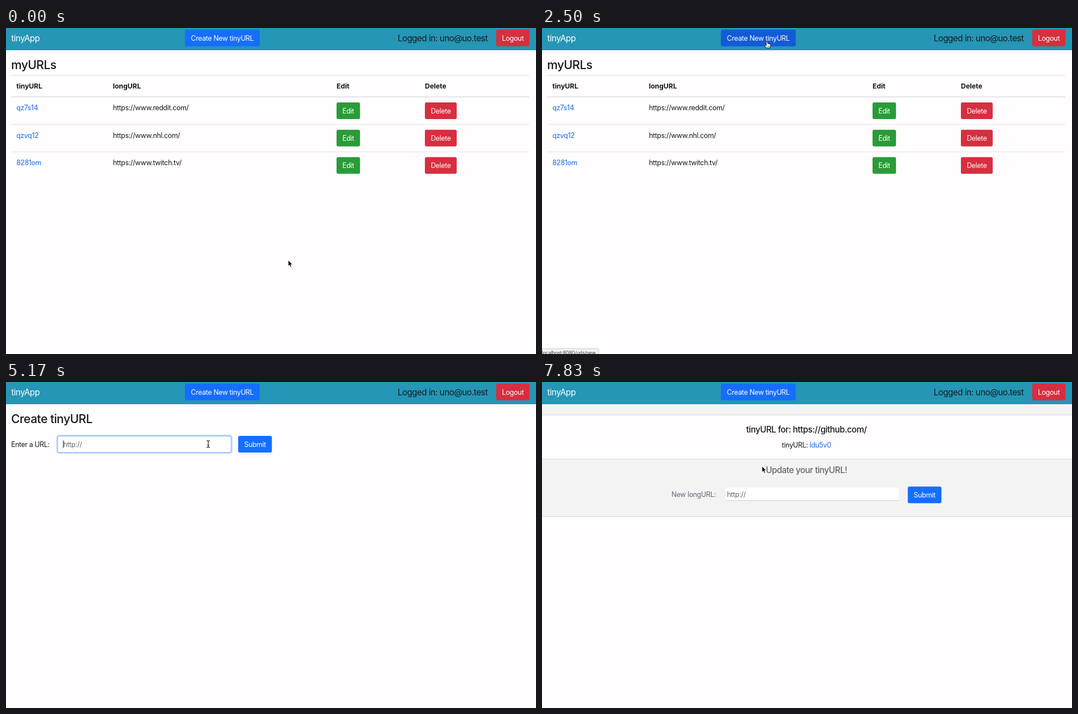
Animation, 954 px wide and 587 px high, one loop 8000 ms. Source, as an HTML page:

```html
<!DOCTYPE html>
<html lang="en">
<head>
<meta charset="utf-8">
<title>tinyApp</title>
<style>
  html, body { margin: 0; width: 100%; height: 100%; overflow: hidden; background: #fffdfe; }
  svg { display: block; width: 954px; height: 587px; }
  text {
    font: 12.5px Inter, "Open Sans", sans-serif;
    font-optical-sizing: none;
    letter-spacing: -.026em;
    fill: #17191c;
    white-space: pre;
  }
  .large { font-size: 15.3px; letter-spacing: -.03em; }
  .title { font-size: 21.4px; font-weight: 550; letter-spacing: -.023em; }
  .medium { font-weight: 500; }
  .bold { font-size: 12.3px; font-weight: 700; letter-spacing: 0; }
  .white { fill: #fff; }
  .link { fill: #1a6ce6; }
  .muted { fill: #62676d; }
  .middle { text-anchor: middle; }
  .small { font-size: 8.8px; letter-spacing: -.02em; fill: #3c4043; }
</style>
</head>
<body>
<svg id="stage" viewBox="0 0 954 587"></svg>
<script>
const BLUE = '#156eff', BLUE_HOVER = '#125bd7', GREEN = '#2a9b38', RED = '#d62f3f';
const LINE = '#dee1e5', PANEL = '#f4f3f4', PANEL_EDGE = '#d9d8d9';

const text = (x, y, value, classes = '', id = '') =>
  `<text x="${x}" y="${y}" class="${classes}" id="${id}">${value}</text>`;
const rect = (x, y, w, h, fill, extra = '') =>
  `<rect x="${x}" y="${y}" width="${w}" height="${h}" fill="${fill}" ${extra}/>`;
const button = (x, y, w, label, fill, id = '') =>
  rect(x, y, w, 30, fill, `rx="3" id="${id}"`) +
  text(x + w / 2, y + 19.8, label, 'white middle');
const group = (id, content) => `<g id="${id}">${content}</g>`;

const navbar =
  rect(0, 0, 954, 40, '#2596b5') +
  text(9.5, 24, 'tinyApp', 'large white') +
  button(322, 3, 134.7, 'Create New tinyURL', BLUE, 'create') +
  text(705, 24, 'Logged in: uno@uo.test', 'large') +
  button(882.3, 3, 60, 'Logout', RED);

const urls = [
  ['qz7s14', 'https://www.reddit.com/'],
  ['qzvq12', 'https://www.nhl.com/'],
  ['8281om', 'https://www.twitch.tv/'],
];
const listRow = ([shortUrl, longUrl], i) => {
  const y = 124.5 + i * 49.25;
  return (i ? rect(9.5, y - .5, 932.5, 1, LINE) : '') +
    text(18.7, y + 23.8, shortUrl, 'link') +
    text(192.5, y + 23.8, longUrl) +
    button(595, y + 9.4, 42.2, 'Edit', GREEN) +
    button(754, y + 9.4, 57.3, 'Delete', RED);
};
const headers = [[18.7, 'tinyURL'], [192.5, 'longURL'], [595, 'Edit'], [754, 'Delete']];
const listPage =
  text(9.3, 74, 'myURLs', 'title') +
  rect(9.5, 84.7, 932.5, 1, LINE) +
  headers.map(([x, label]) => text(x, 109.2, label, 'bold')).join('') +
  rect(9.5, 123.2, 932.5, 1.6, LINE) +
  urls.map(listRow).join('');

const createPage =
  text(9.3, 74, 'Create tinyURL', 'title') +
  text(9.3, 117, 'Enter a URL:') +
  rect(92, 96.2, 314.4, 31.6, 'none', 'id="ring" rx="4" stroke="#bcd7fd" stroke-width="2.5"') +
  rect(93, 97.5, 312.3, 29.3, '#fff', 'id="field" rx="3"') +
  text(103, 117, '', '', 'entry') +
  rect(102.6, 105, 1, 14, '#333', 'id="caret"') +
  button(418, 97, 60.6, 'Submit', BLUE, 'submit');

const detailPage =
  rect(0, 40, 954, 19.5, PANEL) +
  rect(0, 59, 954, 1, PANEL_EDGE) +
  text(476, 91.2, 'tinyURL for: https://github.com/', 'large medium middle') +
  text(476, 118, 'tinyURL: <tspan class="link">ldu5v0</tspan>', 'middle') +
  rect(0, 139, 954, 103.5, PANEL) +
  rect(0, 138.2, 954, 1, PANEL_EDGE) +
  rect(0, 242, 954, 1, PANEL_EDGE) +
  text(476, 163.8, 'Update your tinyURL!', 'large medium middle muted') +
  text(233, 206.6, 'New longURL:', 'muted') +
  rect(330.5, 190.2, 311.5, 23.5, '#fff') +
  rect(330.5, 213, 311.5, 1, '#cfcfd2') +
  text(333, 206.6, 'http://', 'muted') +
  button(658.4, 188.2, 60.6, 'Submit', BLUE);

const status =
  rect(-4, 577.5, 106, 14, '#f4f4f5', 'id="statusBox" rx="2" stroke="#c6c8ca"') +
  text(-.5, 587.6, '', 'small', 'statusText');

// Each pointer is drawn with its hot spot at 0,0.
const pointers =
  group('arrow', `<path d="M0 0V11L2.5 8.7L4.3 12.7L6.2 11.9L4.5 8H7.8Z"
    fill="#000" stroke="#fff" stroke-width=".9"/>`) +
  group('hand', `<path d="M-1.3 1Q0-.7 1.1 1V4.4Q2.4 3.8 3 5Q4.4 4.4 5 5.6Q6.4 5.3 6.6 6.8
    V9.2L5.4 12.4H-1.2L-4 8.6Q-4.3 6.8-2.6 7.2L-1.3 8.4Z" fill="#fff" stroke="#000" stroke-width=".9"/>
    <path d="M1.2 8.2V10.6M3 8.2V10.6M4.8 8.2V10.6" stroke="#000" stroke-width=".6"/>`) +
  group('beam', `<path d="M-3-6.2Q0-6.2 0-4.4Q0-6.2 3-6.2M0-4.6V4.6M-3 6.2Q0 6.2 0 4.4
    Q0 6.2 3 6.2M-1.5 2H1.5" fill="none" stroke="#111" stroke-width="1.1"/>`);

document.getElementById('stage').innerHTML =
  navbar +
  group('list', listPage) + group('form', createPage) + group('detail', detailPage) +
  group('status', status) + group('pointer', pointers);

const el = id => document.getElementById(id);
const show = (id, visible) => el(id).style.display = visible ? '' : 'none';
const between = (t, start, end) => t >= start && t < end;

// Pointer path: time, x, y
const path = [
  [250, 508, 418], [830, 445, 246], [1670, 405, 23.5], [3250, 405, 23.5],
  [3800, 364, 111.7], [5750, 364, 111.7], [6150, 461.5, 110], [6900, 461.5, 110],
  [7450, 396, 151.5],
];
function pointerAt(t) {
  const next = path.findIndex(key => key[0] > t);
  if (next < 1) return (next ? path.at(-1) : path[0]).slice(1);
  const [t0, x0, y0] = path[next - 1], [t1, x1, y1] = path[next];
  const p = (t - t0) / (t1 - t0), k = p * p * (3 - 2 * p);
  return [x0 + (x1 - x0) * k, y0 + (y1 - y0) * k];
}

function draw(t) {
  const page = t < 3160 ? 'list' : t < 6660 ? 'form' : 'detail';
  for (const id of ['list', 'form', 'detail']) show(id, id === page);

  const [x, y] = pointerAt(t);
  const inside = (left, top, right, bottom) => x > left && x < right && y > top && y < bottom;
  const overCreate = inside(322, 3, 456, 33);
  const overSubmit = page === 'form' && inside(418, 97, 478, 127);
  const overField = page === 'form' && inside(93, 97, 405, 127);
  el('create').setAttribute('fill', overCreate ? BLUE_HOVER : BLUE);
  el('submit').setAttribute('fill', overSubmit ? BLUE_HOVER : BLUE);

  const shape = overCreate || overSubmit ? 'hand' : overField ? 'beam' : 'arrow';
  for (const id of ['arrow', 'hand', 'beam']) show(id, id === shape);
  el('pointer').setAttribute('transform', `translate(${x} ${y})`);

  const focused = between(t, 4820, 6160), filled = t >= 5490;
  show('ring', focused);
  show('caret', focused && !filled);
  el('field').setAttribute('stroke', focused ? '#86b5fa' : '#ced3da');
  el('entry').textContent = filled ? 'https://github.com/' : 'http://';
  el('entry').setAttribute('class', filled ? '' : 'muted');

  const loading = between(t, 6160, 6830);
  show('status', loading || between(t, 2490, 3660));
  el('statusBox').setAttribute('width', loading ? 189.5 : 106);
  el('statusText').textContent = loading ? 'localhost' : 'localhost:8080/urls/new';
}

const STEP = 1000 / 6, LOOP = 8000;
const start = performance.now();
function tick() {
  const t = (performance.now() - start) % LOOP;
  draw(Math.floor((t + 5) / STEP) * STEP % LOOP);
  requestAnimationFrame(tick);
}
tick();
</script>
</body>
</html>
```
